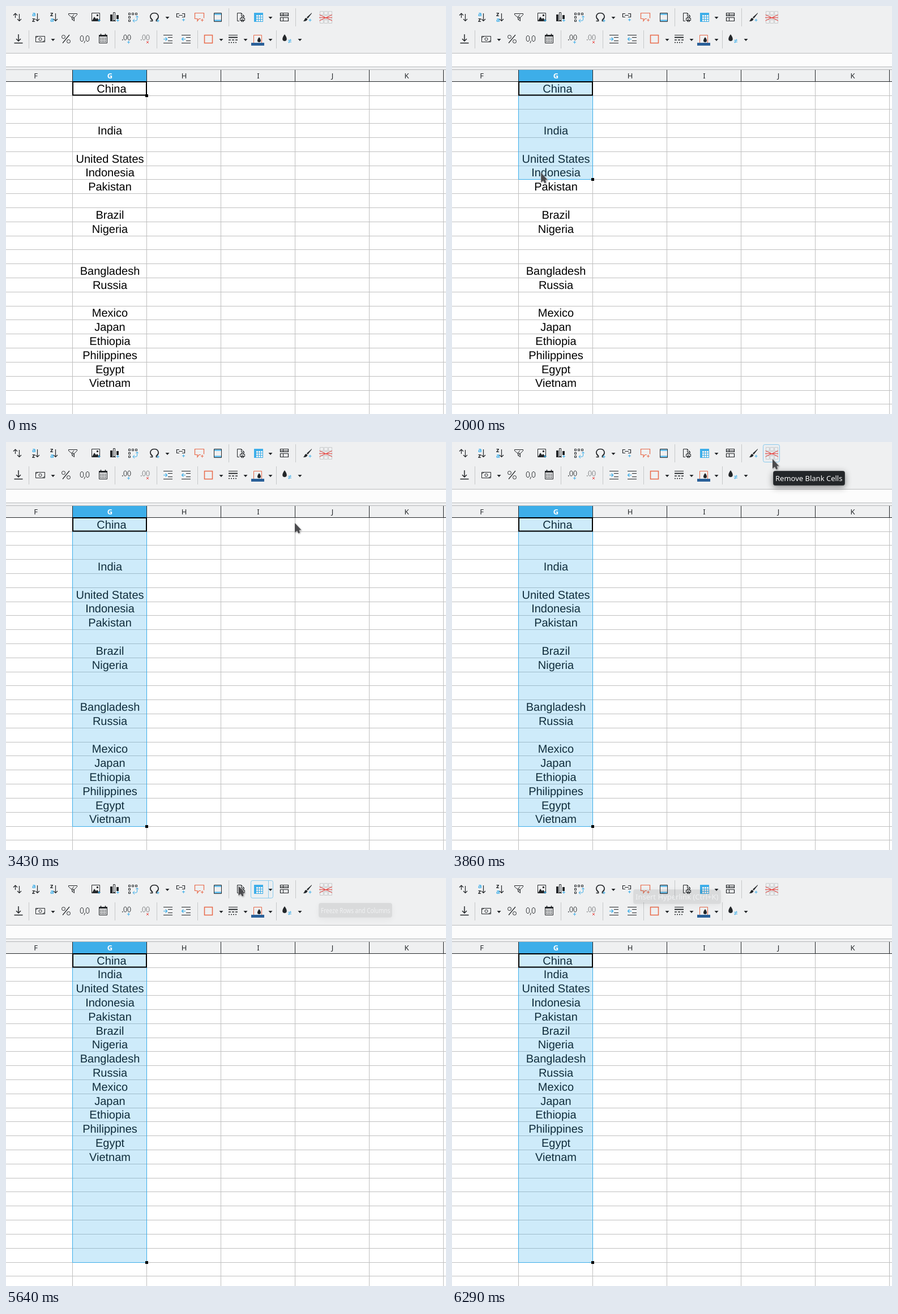
Animation of 777x721 px, one loop 6370 ms. Source, as an HTML page:

```html
<!DOCTYPE html>
<html lang="en">
<head>
<meta charset="utf-8">
<title>Remove blank cells</title>
<style>
  html, body { margin: 0; width: 100%; height: 100%; overflow: hidden; background: #fff; }
  svg { display: block; width: 777px; height: 721px; }
  .ui { font: 13px "Noto Sans", sans-serif; }
  .cell { font: 20px "Liberation Sans", Arial, sans-serif; text-anchor: middle; text-rendering: geometricPrecision; }
  .k, .b, .o, .g, .r { fill: none; stroke: #232629; }
  .b { stroke: #3daee9; }
  .o { stroke: #e8694a; }
  .g { stroke: #c9cbcc; }
  .r { stroke: #e8433f; }
  .f { fill: #232629; }
  #tip { filter: drop-shadow(0 3px 6px rgba(0,0,0,.45)); }
  #cursor { filter: drop-shadow(1px 1px 1px rgba(0,0,0,.3)); }
</style>
</head>
<body>
<svg id="stage" viewBox="0 0 777 721" xmlns="http://www.w3.org/2000/svg"></svg>
<script>
const LOOP = 6370, FPS = 14;
const TOP = 132.8, PITCH = 24.805;
const LEFT = 117, WIDTH = 131;
const SPARSE = ['China', '', '', 'India', '', 'United States', 'Indonesia', 'Pakistan', '',
  'Brazil', 'Nigeria', '', '', 'Bangladesh', 'Russia', '', 'Mexico', 'Japan', 'Ethiopia',
  'Philippines', 'Egypt', 'Vietnam'];
const PACKED = SPARSE.filter(Boolean);

// All moments below are counted in ticks of 1/FPS s.
const DRAG = 21, DROP = 39, CLICK = 64, REMOVED = 66, ENTER = 11, LEAVE = 82;

const ORIGIN = { x: -16, y: 146 };
const LEGS = [
  { from: ENTER, to: 18, x: 147, y: 142, ease: 2 },
  { from: DRAG, to: 24, x: 154, y: 206, ease: 1 },
  { from: 28, to: 36, x: 170, y: 648, ease: 1.9 },
  { from: 37, to: DROP, x: 180, y: 663, ease: 2 },
  { from: 43, to: 48, x: 510, y: 143, ease: 1 },
  { from: 49, to: 50, x: 600, y: 34, ease: 1 },
  { from: 51, to: 51, x: 543, y: 110, ease: 1 },
  { from: 52, to: 53, x: 566, y: 30, ease: 2 },
  { from: 77, to: LEAVE, x: 255, y: -2, ease: 1 }
];

const BUTTONS = [251, 293, 326, 359, 400, 432, 476, 517, 549]
  .map(x => ({ x, w: x === 251 || x === 432 ? 40 : 30 }));

const REMOVE = { text: 'Remove Blank Cells', x: 567, y: 51, w: 127, squeeze: 1 };
const TIPS = [
  { ...REMOVE, on: 53, off: CLICK },
  { ...REMOVE, on: 68, off: 77 },
  { text: 'Freeze Rows and Columns', x: 552, y: 44, w: 130, squeeze: .77, on: 78, off: 77 },
  { text: 'Insert Hyperlink (Ctrl+K)', x: 320, y: 20, w: 155, squeeze: 1, on: 85, off: 86 }
];

const clamp = (v, lo = 0, hi = 1) => Math.min(hi, Math.max(lo, v));
const range = n => [...Array(n).keys()];
const each = (n, make) => range(n).map(make).join('');
const rowY = i => Math.round(TOP + PITCH * i);
const colX = i => LEFT + WIDTH * i;

const rect = (x, y, w, h, fill) => `<rect x="${x}" y="${y}" width="${w}" height="${h}" fill="${fill}"/>`;
const path = (cls, d, w = 1) => `<path class="${cls}" d="${d}" stroke-width="${w}"/>`;
const shape = d => `<path class="f" d="${d}"/>`;
const box = (cls, x, y, w, h, sw) => path(cls, `M${x} ${y}h${w}v${h}h${-w}z`, sw);
const label = (x, y, s, fill, style = '') =>
  `<text class="ui" x="${x}" y="${y}" fill="${fill}" style="${style}">${s}</text>`;
const ring = (x, y, rx = 2.5, ry = 4.5) => `<ellipse class="k" cx="${x}" cy="${y}" rx="${rx}" ry="${ry}"/>`;
const plus = (x, y, cls = 'b') => path(cls, `M${x - 2.5} ${y}h5M${x} ${y - 2.5}v5`);
const drop = (x, y) => shape(`M${x - 3.5} ${y - 2}h7l-3.5 4z`);
const divider = (x, y) => rect(x, y, 1, 32, '#c6c8c9');
const downArrow = (x, y0, y1) => path('k', `M${x} ${y0}V${y1}m-3.5-3.5l3.5 3.5 3.5-3.5`, 1.2);
const tiles = (cols, rows, make) => each(rows, r => each(cols, c => make(c, r)));

function sortIcon(x, first, second) {
  const letter = (s, y) =>
    label(x - 6, y, s, s === 'a' ? '#3daee9' : '#232629', 'font-size:11px;font-weight:600');
  return letter(first, 18) + letter(second, 28) + downArrow(x + 3.5, 13, 26.5);
}

function indentIcon(x, dir) {
  const tip = x + 3.5 + 3 * dir;
  return path('k', `M${x} 51.5h16M${x + 8} 55.5h8M${x + 8} 61.5h8M${x} 65.5h16`) +
    path('b', `M${x} 58.5h7M${tip - 3 * dir} 55.5l${3 * dir} 3 ${-3 * dir} 3`, 1.2);
}

function topIcons() {
  return path('k', 'M16.5 21V13M13 16.5l3.5-3.5 3.5 3.5', 1.2) + downArrow(23.5, 14, 26.5) +
    sortIcon(52, 'a', 'z') + sortIcon(84, 'z', 'a') +
    path('k', 'M110.5 13.5h15v2l-5 5v6l-4-3v-3l-6-5zM120 15l-4 5h4l-3 5') +
    box('k', 151.5, 12.5, 14, 14) + shape('M152 26l4-7 3 4 2-2 4 5z') + rect(160, 15, 3, 3, '#232629') + plus(164.5, 25.5) +
    rect(184, 15, 4, 11, '#232629') + box('k', 189.5, 11.5, 3, 14) + rect(195, 16, 4, 7, '#232629') +
    path('k', 'M184 26.5h10') + plus(197.5, 25.5) +
    tiles(3, 3, (c, r) => c * r ? '' : box('k', 216.5 + 6 * c, 12.5 + 6 * r, 3, 3)) +
    path('b', 'M231.5 18v6q0 2-2 2h-5M227 23l-3 3 3 3M229 20l2.5-2.5 2.5 2.5') +
    path('k', 'M254.5 26.5h4v-2c-6-4-4-12 3.5-12s9.500 8 3.500 12v2h2', 1.7) + plus(268.5, 26) + drop(285, 21) +
    path('k', 'M306 13.5h-4.5v6h4.5M311 13.5h4.5v6h-4.5M305 16.5h7', 1.2) + plus(313.5, 24.5) +
    path('o', 'M344 22.5h-3l-3 4v-4h-4.5v-10h16v9', 1.2) + plus(346.5, 25, 'o') +
    box('k', 367.5, 12.5, 13, 15) + path('b', 'M368 14.5h12M368 25.5h12', 2) +
    divider(393, 4) +
    path('k', 'M412 26.5h-3.5v-14h7l5 5v2M415.5 12.5v5h5') +
    box('k', 413.5, 21.5, 8, 4) + box('k', 415.5, 19.5, 4, 2) + box('k', 415.5, 24.5, 4, 3) +
    rect(438, 12, 16, 16, '#3daee9') +
    tiles(3, 3, (c, r) => rect(442 + c * 4, 16 + r * 4, 3, 3, '#eff0f1')) + drop(467, 21) +
    box('k', 484.5, 12.5, 14, 5, 1.2) + box('k', 484.5, 20.5, 14, 6, 1.2) +
    path('k', 'M489.5 12v6M489.5 20v7M484 15.5h14') +
    divider(511, 4) +
    shape('M540 12l-9 8 2 2 7-9zM530 21l2.5 2c-1 4-5 4-8 4 3-1 2-5 5.500-6z') + plus(537, 25) +
    tiles(3, 3, (c, r) => box('g', 554.5 + c * 7.5, 9.5 + r * 7.5, 6, 6)) +
    path('r', 'M553.5 15.5L576 26M553.5 26L576 15.5M553 20.5h23');
}

function bottomIcons() {
  const decimals = x => ring(x - 2.5, 55.5) + ring(x + 4.5, 55.5) + rect(x - 8, 59, 1.5, 1.5, '#232629');
  const dashes = (y, on) => `<g stroke-dasharray="${on} 2">${path('k', `M393 ${y}h16`, 1.5)}</g>`;
  return path('k', 'M22 50V62M18 58l4 4 4-4M14.500 65.5h15', 1.5) +
    divider(40, 43) +
    box('k', 52.5, 53.5, 16, 10) + ring(60.5, 58.5, 2.5, 2.5) + path('k', 'M53 56l3-2M65 63l3-2') + drop(83, 60) +
    path('k', 'M112 51L100 65.5', 1.2) + ring(101.5, 54.5, 3, 3) + ring(110.5, 62.5, 3, 3) +
    ring(134, 57.5, 2.8, 5) + ring(144, 57.5, 2.8, 5) + path('k', 'M139.5 61.5l-1.5 4') +
    box('k', 164.5, 51.5, 14, 14) + rect(164, 51, 15, 3, '#232629') + path('k', 'M167.5 49v3M175.5 49v3', 1.5) +
    tiles(4, 3, (c, r) => rect(166 + c * 3, 56 + r * 3, 1.6, 1.6, '#232629')) +
    divider(192, 43) +
    decimals(213) + plus(216.5, 64) +
    `<g opacity=".6">${decimals(246)}</g>` + path('r', 'M248 62l4 4M252 62l-4 4') +
    divider(266, 43) + indentIcon(278, 1) + indentIcon(310, -1) + divider(338, 43) +
    box('o', 350.5, 51.5, 14, 14, 1.5) + drop(380, 60) +
    path('k', 'M393 51.5h16') + path('k', 'M393 55.5h16', 2) + dashes(60, 4) + dashes(64.5, 2) + drop(423, 60) +
    box('o', 437.5, 51.5, 14, 14) + shape('M447 55c5 6 3 9 0 9s-5-3 0-9z') +
    rect(433, 65, 23, 5, '#2a6099') + drop(467, 60) +
    divider(477, 43) +
    shape('M492 50c6 8 4 12 0 12s-6-4 0-12z') +
    path('b', 'M498 60.5h6M498 63.5h6M502.5 58.5l-3 7') + drop(519, 60);
}

function headers() {
  const name = (s, i) => label(colX(i) - 64.5, 128, s, s === 'G' ? '#fff' : '#232629',
    `text-anchor:middle;font-weight:${s === 'G' ? 700 : 400}`);
  return rect(0, 112, 777, 21, '#eff0f1') + rect(0, 112, 777, 1, '#b4b6b8') +
    rect(LEFT, 113, WIDTH, 20, '#3daee9') +
    each(6, i => rect(colX(i), 113, 1, 20, '#232629')) + rect(0, 133, 777, 1, '#232629') +
    [...'FGHIJK'].map(name).join('');
}

const stage = document.getElementById('stage');
stage.innerHTML =
  rect(0, 0, 777, 721, '#fff') +
  each(6, i => rect(colX(i), 134, 1, 587, '#c0c0c0')) +
  each(24, i => rect(0, rowY(i), 777, 1, '#c0c0c0')) +
  '<g id="cells">' + each(SPARSE.length, i =>
    `<text class="cell" x="${i ? 183.5 : 186.5}" y="${Math.round(TOP + PITCH * i + 19.75)}"></text>`) + '</g>' +
  rect(0, 0, 777, 113, '#eff0f1') + rect(0, 83, 777, 25, '#b9bbbd') + rect(0, 84, 777, 23, '#fcfcfc') +
  headers() +
  '<rect id="shade" x="117" y="134" width="132" fill="#3daee9"/><path id="edge" class="b"/>' +
  box('k', 118, 134, 130, 23.5, 2).replace('class="k"', 'fill="none" stroke="#000"') +
  '<rect id="handle" x="246" width="5" height="5"/>' +
  '<g id="hover"><rect y="4.5" height="31" rx="3" fill="#3daee9" stroke="#3daee9" stroke-opacity=".55"/>' +
  '<path d="M463.5 5v30" stroke="#3daee9" opacity=".55"/></g>' +
  topIcons() + bottomIcons() +
  '<g id="tip"><rect height="25" rx="3" fill="#232629" stroke="#3d4043"/><text class="ui" fill="#fcfcfc"></text></g>' +
  '<path id="cursor" d="M0 0V17L4 13.8 6.3 18.5 9 17.2 7.6 12.6H11.5Z" fill="#4b4b4e" stroke="#e8e8e8" stroke-width=".8" paint-order="stroke"/>';

const $ = id => document.getElementById(id);
const set = (el, attrs) => { for (const k in attrs) el.setAttribute(k, attrs[k]); };
const cells = [...$('cells').children];

function pointer(tick) {
  let p = ORIGIN;
  for (const leg of LEGS) {
    if (tick < leg.from) break;
    const part = clamp((tick - leg.from + 1) / (leg.to - leg.from + 1));
    const e = 1 - (1 - part) ** leg.ease;
    p = { x: p.x + (leg.x - p.x) * e, y: p.y + (leg.y - p.y) * e };
  }
  return p;
}

function drawSelection(tick) {
  const y = pointer(Math.min(tick, DROP)).y;
  const last = tick < DRAG ? 0 : Math.floor((y - TOP) / PITCH);
  const bottom = rowY(last + 1);
  const shown = last > 0 ? 1 : 0;
  set($('shade'), { height: bottom - 134, opacity: shown * .25 });
  set($('edge'), { d: `M117.5 134V${bottom + .5}H248.5V134`, opacity: shown });
  set($('handle'), { y: bottom - 2 });
}

// The highlight trails the pointer by one tick.
function drawHover(tick, inside) {
  const p = pointer(tick - 1);
  const hit = inside && p.y < 36 && BUTTONS.find(b => p.x >= b.x && p.x < b.x + b.w);
  set($('hover'), { visibility: hit ? 'visible' : 'hidden' });
  if (!hit) return;
  const [frame, split] = $('hover').children;
  const pressed = tick >= CLICK && tick < REMOVED;
  set(frame, { x: hit.x + .5, width: hit.w - 1, 'fill-opacity': pressed ? .3 : .02 });
  set(split, { opacity: hit.x === 432 ? .55 : 0 });
}

function drawTip(tick) {
  const tip = TIPS.findLast(t => t.on <= tick) || TIPS[0];
  const fadeIn = clamp((tick - tip.on + 1) / 2);
  const fadeOut = clamp(1 - .3 * (tick - tip.off + 1));
  const [frame, words] = $('tip').children;
  set($('tip'), { opacity: Math.min(fadeIn, fadeOut) });
  set(frame, { x: tip.x + .5, y: tip.y + .5, width: tip.w - 1 });
  set(words, { transform: `translate(${tip.x + 4} ${tip.y + 17.5}) scale(${tip.squeeze} 1)` });
  words.textContent = tip.text;
}

function draw(ms) {
  const tick = Math.floor((ms + 5) * FPS / 1000);
  const inside = tick >= ENTER && tick < LEAVE;
  const { x, y } = pointer(tick);
  const list = tick >= REMOVED ? PACKED : SPARSE;
  cells.forEach((cell, i) => { cell.textContent = list[i] || ''; });
  drawSelection(tick);
  drawHover(tick, inside);
  drawTip(tick);
  set($('cursor'), { transform: `translate(${x} ${y})`, visibility: inside ? 'visible' : 'hidden' });
}

const start = performance.now();
function run(now) {
  draw(Math.max(0, now - start) % LOOP);
  requestAnimationFrame(run);
}
draw(0);
requestAnimationFrame(run);
</script>
</body>
</html>
```
